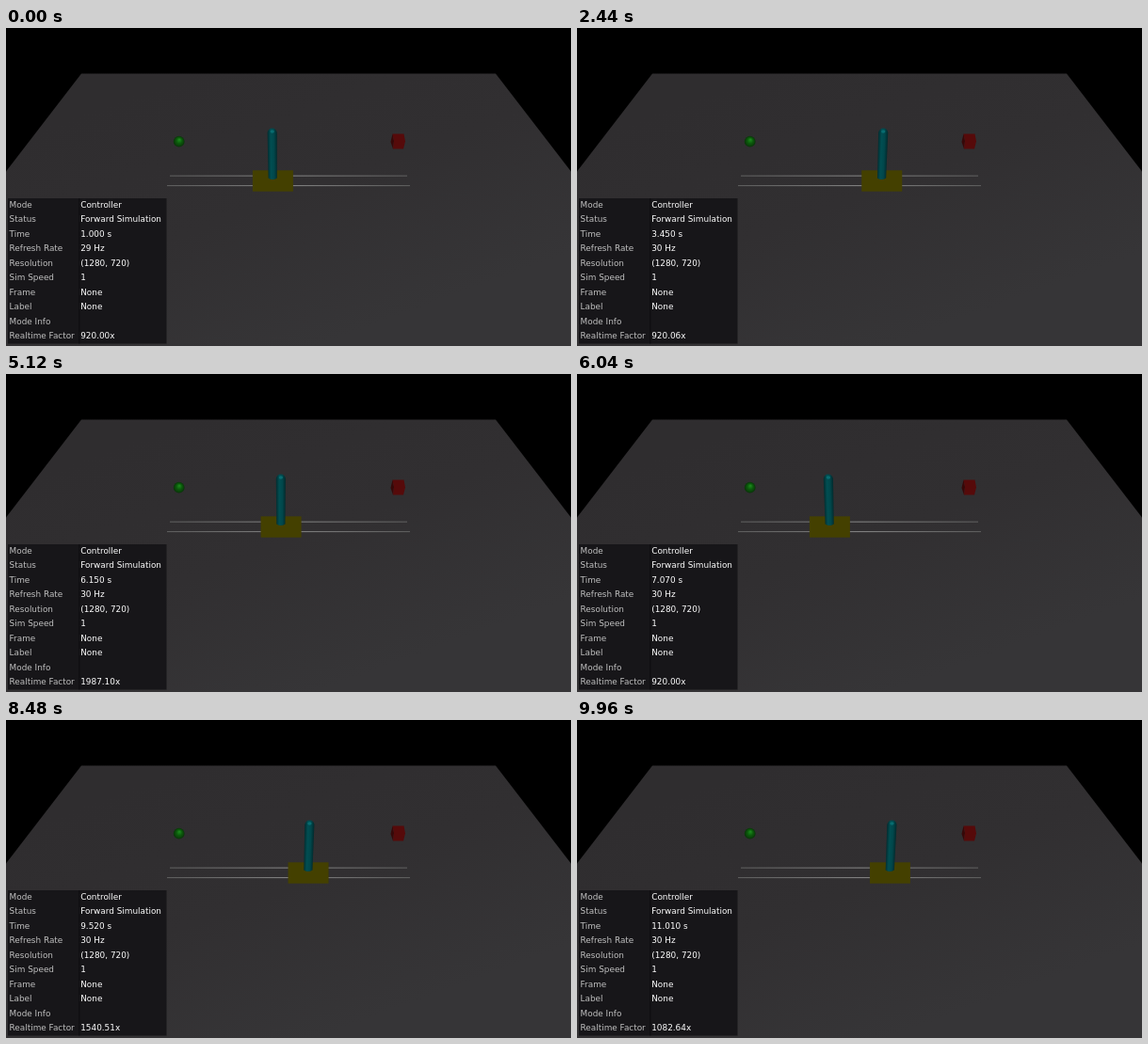
Write an HTML page with a canvas that moves like this. It is 600x338 px and loops after 10 s.

```html
<!DOCTYPE html>
<html>
<head>
<meta charset="utf-8">
<style>
html, body { margin: 0; width: 100%; height: 100%; overflow: hidden; background: #000; }
canvas { display: block; width: 600px; height: 338px; }
</style>
</head>
<body>
<canvas id="stage" width="600" height="338"></canvas>
<script>
const ctx = document.getElementById('stage').getContext('2d');
const LOOP = 10000, STEP = 40, CENTER = 300;

// Steady sway plus a start-up offset that dies away.
function cartX(t) {
  return 301.5 + 35.5 * Math.cos(1.025 * (t - 3.32)) + 16 * Math.exp(-2.5 * t);
}

function simTime(t) {
  return Math.round((1 + 1.005 * t) * 100) / 100;
}

function noise(n) {
  const v = Math.sin(n * 12.9898) * 43758.5453;
  return v - Math.floor(v);
}

// Mostly just under 1000, with occasional bursts.
function realtimeFactor(t) {
  return 920 + 1400 * noise(Math.round(t * 1000 / STEP)) ** 4;
}

function poly(fill, ...points) {
  ctx.beginPath();
  points.forEach(([x, y]) => ctx.lineTo(x, y));
  ctx.closePath();
  ctx.fillStyle = fill;
  ctx.fill();
}

function gradient(x0, y0, x1, y1, ...colors) {
  const g = ctx.createLinearGradient(x0, y0, x1, y1);
  colors.forEach((c, i) => g.addColorStop(i / (colors.length - 1), c));
  return g;
}

function rail(halfWidth, y) {
  const x = CENTER - halfWidth;
  ctx.fillStyle = gradient(x, 0, x + 2 * halfWidth, 0, '#5c5c5c', '#808080', '#5c5c5c');
  ctx.fillRect(x, y, 2 * halfWidth, 1.1);
}

function drawBall(x, y, r) {
  const shade = ctx.createRadialGradient(x + 0.5, y - 2, 0.5, x, y, r);
  shade.addColorStop(0, '#1c861c');
  shade.addColorStop(0.45, '#0b5c0b');
  shade.addColorStop(1, '#0a320a');
  ctx.fillStyle = shade;
  ctx.beginPath();
  ctx.arc(x, y, r, 0, Math.PI * 2);
  ctx.fill();
}

function drawScene() {
  ctx.fillStyle = '#000';
  ctx.fillRect(0, 0, 600, 338);
  poly(gradient(220, 40, 330, 338, '#2f2d2f', '#312f31', '#363537'),
    [80, 48.5], [520, 48.5], [600, 152.5], [600, 338], [0, 338], [0, 152.5]);

  drawBall(183.7, 120.7, 5.9);
  poly('#360808', [410.5, 112.5], [412, 120], [411, 128.5], [408.5, 121]);
  poly('#560a0a', [410.5, 112.5], [422.5, 112.5], [424, 120.5], [422, 128.5], [411, 128.5], [412, 120]);

  rail(126, 156.6);
  rail(129, 167);
}

function drawCart(x) {
  ctx.fillStyle = '#444000';
  ctx.fillRect(x - 21.3, 151.3, 43, 22.4);

  // Perspective and balance lean the pole away from the middle.
  const lean = (x - CENTER) * 0.055 + 0.4;
  ctx.save();
  ctx.translate(x, 160);
  ctx.transform(1, 0, -lean / 50, 1, 0, 0);
  ctx.fillStyle = gradient(-5, 0, 5, 0, '#022d30', '#014e52', '#01474b', '#022a2d');
  ctx.beginPath();
  ctx.moveTo(-4.6, -0.5);
  ctx.lineTo(-5.1, -48.5);
  ctx.arc(0, -48.5, 5.1, Math.PI, 0);
  ctx.lineTo(4.6, -0.5);
  ctx.quadraticCurveTo(0, 2.5, -4.6, -0.5);
  ctx.fill();
  ctx.fillStyle = '#086c70';
  ctx.beginPath();
  ctx.ellipse(0, -50, 2.2, 1.8, 0, 0, Math.PI * 2);
  ctx.fill();
  ctx.restore();
}

function drawPanel(t) {
  const rows = [
    ['Mode', 'Controller'],
    ['Status', 'Forward Simulation'],
    ['Time', simTime(t).toFixed(3) + ' s'],
    ['Refresh Rate', (t < 0.5 ? 29 : 30) + ' Hz'],
    ['Resolution', '(1280, 720)'],
    ['Sim Speed', '1'],
    ['Frame', 'None'],
    ['Label', 'None'],
    ['Mode Info', ''],
    ['Realtime Factor', realtimeFactor(t).toFixed(2) + 'x']
  ];
  ctx.fillStyle = '#171619';
  ctx.fillRect(2, 181, 168.5, 154.5);
  ctx.fillStyle = '#0d0c0f';
  ctx.fillRect(77.3, 181, 1, 154.5);
  ctx.font = '8.9px "DejaVu Sans", sans-serif';
  rows.forEach(([label, value], i) => {
    const y = 190.8 + i * 15.48;
    ctx.fillStyle = '#c0c0c0';
    ctx.fillText(label, 3.6, y);
    ctx.fillStyle = '#fff';
    ctx.fillText(value, 79.2, y);
  });
}

function draw(ms) {
  const t = Math.floor((ms % LOOP) / STEP + 1e-6) * STEP / 1000;
  drawScene();
  drawCart(cartX(t));
  drawPanel(t);
}

const start = performance.now();
function tick() {
  draw(performance.now() - start);
  requestAnimationFrame(tick);
}
tick();
</script>
</body>
</html>
```
